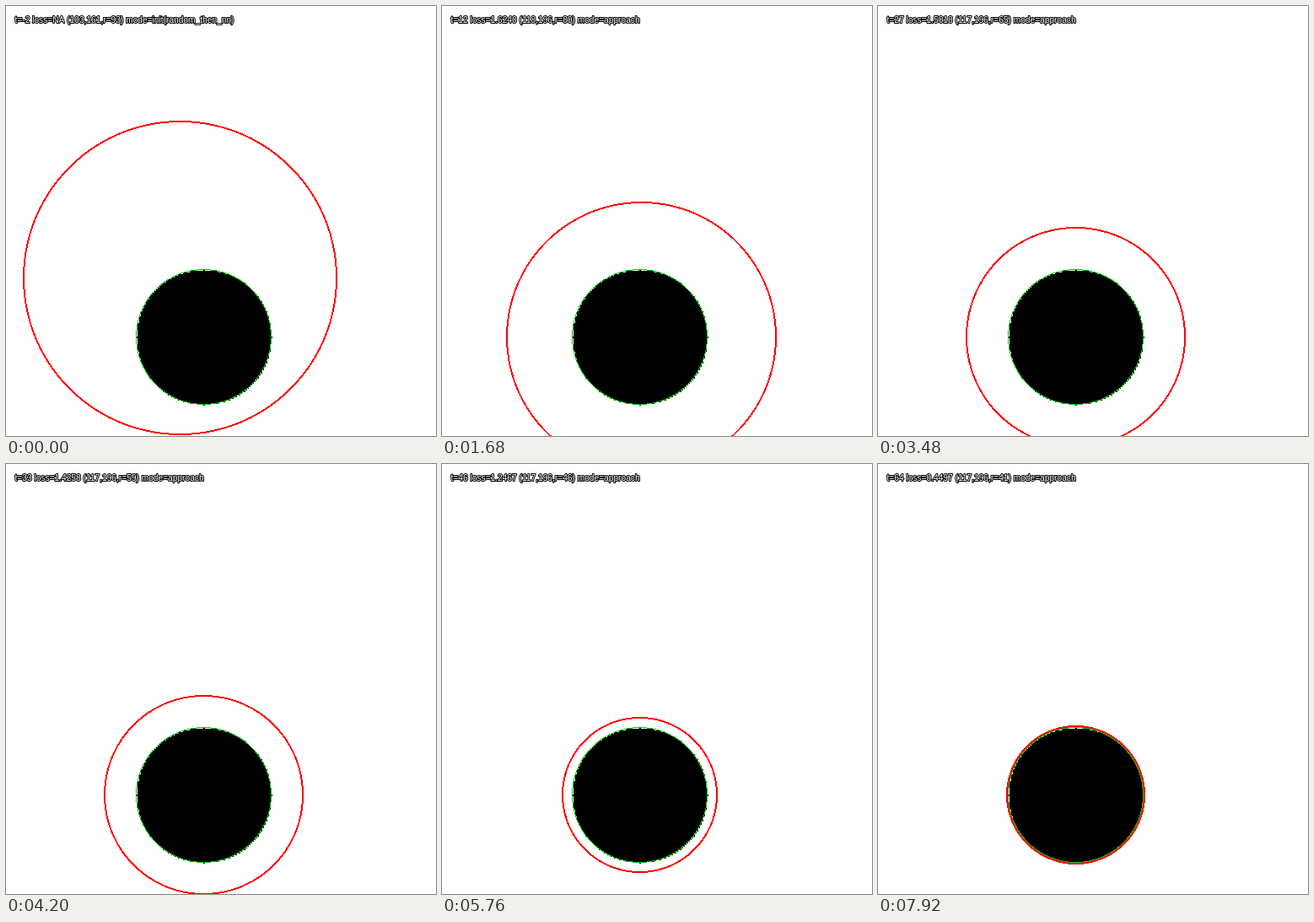
An HTML page with a canvas for the animation above (8 s loop, 510 by 510 pixels).

```html
<!DOCTYPE html>
<html lang="en">
<head>
<meta charset="utf-8">
<title>Circle fit</title>
<style>
html, body { margin: 0; width: 100%; height: 100%; overflow: hidden; background: #fff; }
canvas { display: block; width: 510px; height: 510px; }
</style>
</head>
<body>
<canvas id="stage" width="510" height="510"></canvas>
<script>
const SIZE = 510, LOOP = 8000, STEP = 120, SCALE = 2;
const GOAL = { x: 117, y: 196, r: 40 };
// Loss at chosen steps, linear in between.
const LOSS = [[0, 1.6982], [12, 1.6240], [21, 1.5570], [27, 1.5018],
              [38, 1.3624], [46, 1.2467], [51, 0.4497], [64, 0.4497]];
const ctx = document.getElementById('stage').getContext('2d');

function lossAt(t) {
  const i = Math.max(1, LOSS.findIndex(p => p[0] >= t));
  const [t0, a] = LOSS[i - 1], [t1, b] = LOSS[i];
  return a + (b - a) * (t - t0) / (t1 - t0);
}

function poseAt(t) {
  const n = Math.min(t + 2, 7);
  const drift = t > 5 && t < 16 ? 1 : 0;
  return {
    x: 103 + 2 * n + drift,
    y: 161 + 5 * n,
    r: Math.max(41, Math.min(93, 92 - t))
  };
}

// Hard-edged ring; its outer edge passes through the pixels at distance r.
function ring({ x, y, r }, width, color) {
  const cx = x * SCALE, cy = y * SCALE, outer = r * SCALE + 0.5;
  ctx.fillStyle = color;
  for (let dy = -r * SCALE; dy <= r * SCALE; dy++) {
    for (let dx = -r * SCALE; dx <= r * SCALE; dx++) {
      const d = Math.hypot(dx, dy);
      if (d <= outer && d > outer - width) ctx.fillRect(cx + dx, cy + dy, 1, 1);
    }
  }
}

// Solid disc on the coarse grid of 2 px cells.
function disc({ x, y, r }) {
  ctx.fillStyle = '#000';
  for (let dy = -r; dy <= r; dy++) {
    const half = Math.floor(Math.sqrt(r * r - dy * dy));
    ctx.fillRect((x - half) * SCALE, (y + dy) * SCALE, (2 * half + 1) * SCALE, SCALE);
  }
}

function label(t, { x, y, r }) {
  const init = t < 0;
  const loss = init ? 'NA' : lossAt(t).toFixed(4);
  const mode = init ? 'init(random_then_nn)' : 'approach';
  const text = `t=${t} loss=${loss} (${x},${y},r=${r}) mode=${mode}`;
  ctx.font = '10.2px "Liberation Sans", Arial, sans-serif';
  ctx.textBaseline = 'alphabetic';
  ctx.lineJoin = 'round';
  ctx.lineWidth = 2;
  ctx.strokeStyle = '#000';
  ctx.strokeText(text, 10.5, 20);
  ctx.fillStyle = '#fff';
  ctx.fillText(text, 10.5, 20);
}

function draw(t) {
  const pose = poseAt(t);
  ctx.fillStyle = '#fff';
  ctx.fillRect(0, 0, SIZE, SIZE);
  disc(GOAL);
  ring(GOAL, 1, '#00c800');
  ring(pose, 2, '#f00');
  label(t, pose);
}

let shown = null;
function tick() {
  const t = Math.floor((performance.now() % LOOP) / STEP) - 2;
  if (t !== shown) draw(shown = t);
  requestAnimationFrame(tick);
}
tick();
</script>
</body>
</html>
```
